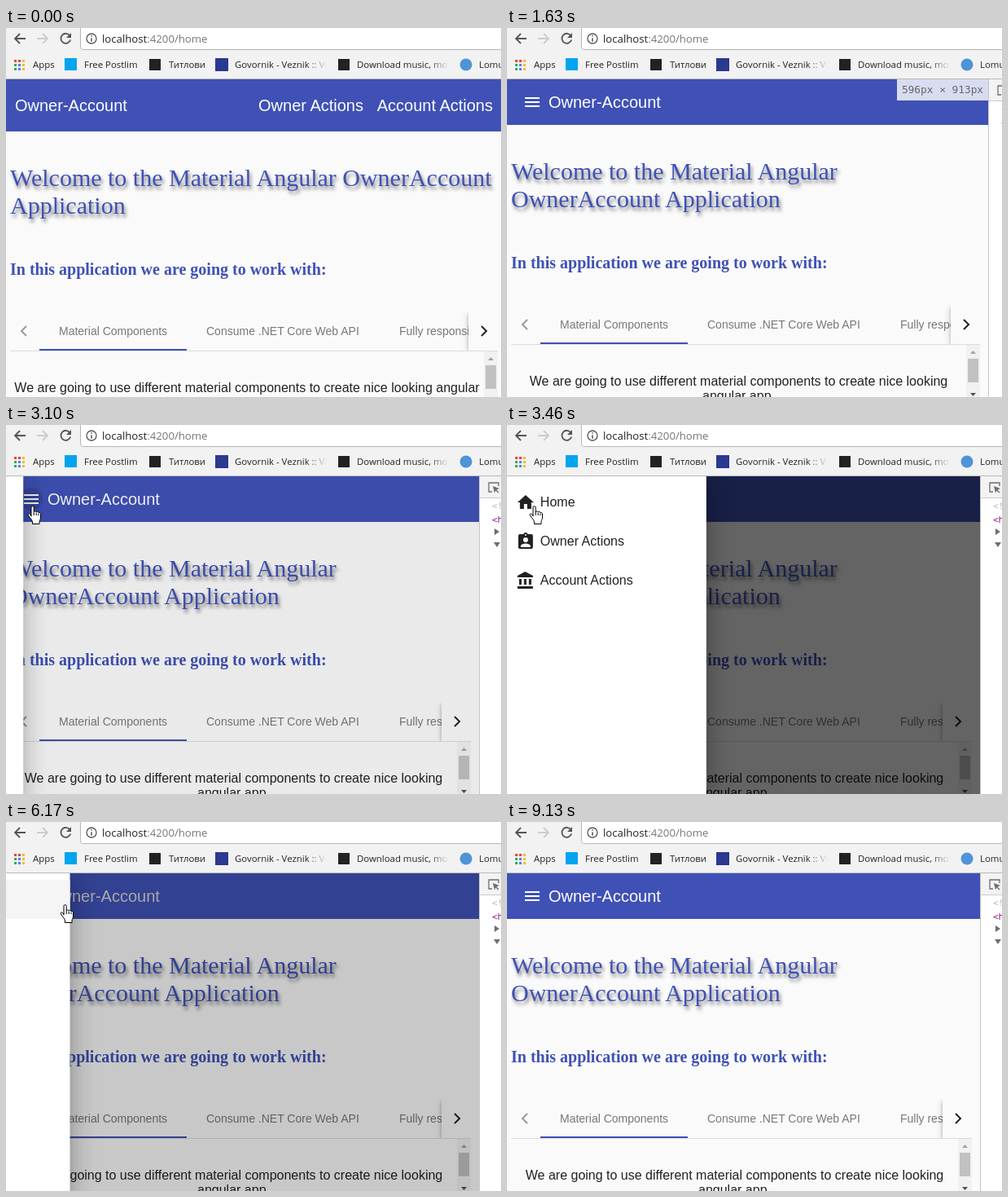
Animation of 608x453 px, one loop 9.21 s. Source, as an HTML page:

```html
<!DOCTYPE html>
<html lang="en">
<head>
<meta charset="utf-8">
<title>Owner-Account</title>
<style>
html, body { margin: 0; width: 100%; height: 100%; overflow: hidden; }
#stage { position: relative; width: 608px; height: 453px; overflow: hidden; background: #fff;
  font: 16px/18px "Liberation Sans", Arial, sans-serif; --w: 614px; }
#stage * { box-sizing: border-box; }
#stage div, #stage span, #stage svg, h1, h3, p, nav, header { position: absolute; margin: 0; white-space: nowrap; }

#browser { left: 0; top: 0; width: 608px; height: 63px; background: #f2f2f2; border-bottom: 1px solid #b9b9b9;
  font: 11.4px/18px "Open Sans", "Noto Sans", sans-serif; color: #222; }
#browser span { top: 36px; overflow: hidden; }
#browser .fade { width: 113px; -webkit-mask-image: linear-gradient(90deg, #000 78%, transparent);
  mask-image: linear-gradient(90deg, #000 78%, transparent); }
#browser #url { top: 4px; left: 118px; font-size: 13.2px; color: #777; }
#url b { font-weight: 400; color: #222; }

#page { left: 0; top: 0; width: var(--w); height: 453px; overflow: hidden; background: #fafafa; }
#bar { left: 0; top: 63px; width: 100%; height: 64px; background: #3f51b5; color: #fff; font-size: 20px; line-height: 64px; }
#title { left: 11px; }
#bar .link { right: 16px; }
#bar .link + .link { right: 175px; }
#menu { display: none; left: 11px; top: 8px; width: 40px; height: 40px; fill: #fff; }
.xs #bar { height: 56px; line-height: 56px; }
.xs #bar .link { display: none; }
.xs #title { left: 51px; }
.xs #menu { display: block; }
#body { left: 0; top: 0; width: 100%; height: 480px; }
.xs #body { top: -8px; }
h1 { left: 5px; top: 167px; width: calc(100% - 15px); font: 30px/34px "Liberation Serif", "Times New Roman", serif;
  color: #3f51b5; text-shadow: 2px 4px 4px rgba(0,0,0,.5); }
h3 { left: 5px; top: 284px; font: bold 20px/24px "Liberation Serif", "Times New Roman", serif; color: #3f51b5; }
#stage h1, #stage p { white-space: normal; }
#tabs { left: 5px; top: 348px; width: calc(100% - 15px); height: 49px; overflow: hidden;
  border-bottom: 1px solid #dcdcdc; font-size: 14px; line-height: 48px; color: rgba(0,0,0,.52); }
#ink { left: 36px; top: 46px; width: 181px; height: 2px; background: #3f51b5; }
#next { right: 0; top: 0; width: 36px; height: 48px; background: #fafafa;
  box-shadow: 0 2px 4px -1px rgba(0,0,0,.2), 0 4px 5px rgba(0,0,0,.14), 0 1px 10px rgba(0,0,0,.12); }
.chevron { top: 17px; fill: none; stroke-width: 2; }
p { left: 5px; top: 433px; width: calc(100% - 32px); text-align: center; color: rgba(0,0,0,.87); }
#scroll { right: 10px; top: 397px; }
#backdrop { left: 0; top: 63px; width: 100%; height: 390px; background: #000; }
#drawer { left: -5px; top: 63px; width: 250px; height: 390px; background: #fff; padding: 8px 0;
  box-shadow: 0 8px 10px -5px rgba(0,0,0,.2), 0 16px 24px 2px rgba(0,0,0,.14), 0 6px 30px 5px rgba(0,0,0,.12); }
#drawer .item { position: relative; height: 48px; line-height: 47px; padding-left: 46px; color: rgba(0,0,0,.87); }
#drawer .item.hover { color: #d3d3d3; background: #f5f5f5; }
.item svg { left: 16px; top: 12px; fill: currentColor; }

#badge { top: 63px; left: calc(var(--w) - 112px); width: 112px; height: 26px; text-align: center;
  background: rgba(255,255,255,.8); color: #666; font: 12.8px/26px "DejaVu Sans Mono", monospace; }
#tools { left: var(--w); top: 63px; width: 60px; height: 390px; background: #fff; border-left: 1px solid #c4c4c4;
  font: 11px/16px "DejaVu Sans Mono", monospace; color: #881280; }
#tools header { left: 0; top: 0; width: 60px; height: 27px; background: #f3f3f3; border-bottom: 1px solid #ccc; }
#tools span { left: 15px; }
#cursor { left: 0; top: 0; fill: #fff; stroke: #000; stroke-linejoin: round; }
</style>
</head>
<body>
<div id="stage">
  <div id="page">
    <div id="body">
      <h1>Welcome to the Material Angular OwnerAccount Application</h1>
      <h3>In this application we are going to work with:</h3>
      <div id="tabs">
        <svg class="chevron" style="left:12px" width="10" height="14" stroke="#999"><path d="M8 1 2 7l6 6"/></svg>
        <span style="left:60px">Material Components</span>
        <span style="left:241px">Consume .NET Core Web API</span>
        <span style="left:478px">Fully responsive</span>
        <div id="ink"></div>
        <div id="next"><svg class="chevron" style="left:14px" width="10" height="14" stroke="#222"><path d="M2 1l6 6-6 6"/></svg></div>
      </div>
      <p>We are going to use different material components to create nice looking angular app.</p>
      <svg id="scroll" width="17" height="69">
        <path fill="#f1f1f1" d="M0 0h17v69H0z"/><path fill="#c1c1c1" d="M2 17h13v29H2z"/>
        <path fill="#a3a3a3" d="M5 11l3.5-4 3.5 4z"/><path fill="#505050" d="M5 59l3.5 4 3.5-4z"/>
      </svg>
    </div>
    <div id="bar">
      <svg id="menu"><circle id="ripple" cx="20" cy="20" fill="#000" opacity=".12"/>
        <path d="M11 14h18v2H11zm0 5h18v2H11zm0 5h18v2H11z"/></svg>
      <span id="title">Owner-Account</span>
      <span class="link">Account Actions</span><span class="link">Owner Actions</span>
    </div>
    <div id="backdrop"></div>
    <nav id="drawer">
      <div class="item"><svg width="24" height="24"><path d="M10 20v-6h4v6h5v-8h3L12 3 2 12h3v8z"/></svg>Home</div>
      <div class="item"><svg width="24" height="24"><path d="M19 3h-4.2a3 3 0 0 0-5.6 0H5a2 2 0 0 0-2 2v14a2 2 0 0 0 2 2h14a2 2 0 0 0 2-2V5a2 2 0 0 0-2-2zm-7 0a1 1 0 1 1 0 2 1 1 0 0 1 0-2zm0 4a3 3 0 1 1 0 6 3 3 0 0 1 0-6zm6 12H6v-1.4c0-2 4-3.1 6-3.1s6 1.1 6 3.1z"/></svg>Owner Actions</div>
      <div class="item"><svg width="24" height="24"><path d="M4 10v7h3v-7zm6 0v7h3v-7zM2 22h19v-3H2zm14-12v7h3v-7zM11.5 1 2 6v2h19V6z"/></svg>Account Actions</div>
    </nav>
  </div>
  <div id="tools">
    <header><svg width="40" height="27" fill="none" stroke="#6e6e6e" stroke-width="1.3">
      <path d="M15 19h-4V8h12v4"/><path fill="#6e6e6e" d="M16 12l8 3-3.500 1.500 3 3-1 1-3-3-1.500 3z" stroke="none"/></svg></header>
    <span style="top:29px;color:#b8b8b8">&lt;!doctype html&gt;</span>
    <span style="top:46px">&lt;html&gt;</span>
    <svg style="left:16px;top:63px" width="12" height="28" fill="#6e6e6e"><path d="M2 1l6 4-6 4zM1 18h8l-4 6z"/></svg>
  </div>
  <div id="badge"></div>
  <div id="browser">
    <svg width="608" height="62" fill="none" stroke-width="1.8">
      <path fill="#fff" stroke="#b5b5b5" stroke-width="1" d="M620-5H94.500q-3 0-3 3v25q0 3.500 3 3.500H620z"/>
      <path stroke="#555" d="M24 13H11m6-6-6 6 6 6M78.500 9.500a6 6 0 1 0 .7 5"/>
      <path fill="#555" d="M80 6v6h-6z"/>
      <path stroke="#ccc" d="M38 13h13m-6-6 6 6-6 6"/>
      <circle cx="105" cy="13" r="6" stroke="#555" stroke-width="1.3"/>
      <path stroke="#555" stroke-width="1.500" d="M105 9v1.600m0 1.600v4.500"/>
      <g id="apps"></g>
      <path fill="#00a4ef" d="M72 37h15v15H72z"/><path fill="#222" d="M176 38h14v14h-14zM408 38h14v14h-14z"/>
      <path fill="#2b3990" d="M257 37h16v16h-16z"/><circle cx="565" cy="45" r="7.500" fill="#4f93d8"/>
    </svg>
    <span id="url"><b>localhost</b>:4200/home</span>
    <span style="left:33px">Apps</span>
    <span style="left:96px">Free Postlim</span>
    <span style="left:200px">Титлови</span>
    <span class="fade" style="left:281px">Govornik - Veznik :: Vi</span>
    <span class="fade" style="left:431px">Download music, mov</span>
    <span style="left:581px">Lomura</span>
  </div>
  <svg id="cursor" width="26" height="28">
    <g id="hand"><path d="M5 14V3.200a1.600 1.600 0 0 1 3.200 0V9a1.600 1.600 0 0 1 3-.2 1.600 1.600 0 0 1 2.800.9 1.600 1.600 0 0 1 2.500 1.300v5c0 2-1.500 3-1.500 5v2.500H6.500V21C6 18 3 16 1.300 12.800c-.8-1.500 1.200-2.800 2.300-1.200z"/>
      <path d="M8.200 9v4M11.200 9.500V13M14 10.500V13"/></g>
    <path id="arrow" d="M6.500.8v15.700l3.600-3.400 2.300 5.400 2.300-1-2.300-5.200h5z"/>
  </svg>
</div>
<script>
const LOOP = 9210, $ = id => document.getElementById(id);
const stage = $("stage"), items = [...document.querySelectorAll(".item")];
const clamp = v => Math.min(1, Math.max(0, v));
const show = (el, on) => el.style.visibility = on ? "visible" : "hidden";

// cursor stops: time, x, y
const PATH = [
  [2150, 500, 395], [2400, 210, 225], [2620, 70, 128], [2800, 26, 98], [3460, 27, 98],
  [3770, 30, 100], [4000, 32, 104], [4320, 45, 141], [4470, 46, 143], [4780, 60, 199],
  [5000, 60, 197], [5140, 60, 146], [5390, 60, 144], [5630, 64, 106], [5780, 66, 100],
  [6640, 66, 100], [6810, 72, 98], [6870, 74, 104], [7110, 118, 350]
];
const EXIT = [[7810, 368, 441], [7970, 390, 447]];

function along(path, t) {
  const i = Math.max(1, path.findIndex(k => k[0] >= t));
  const a = path[i - 1], b = path[i], p = clamp((t - a[0]) / (b[0] - a[0]));
  return [a[1] + (b[1] - a[1]) * p, a[2] + (b[2] - a[2]) * p];
}

// cubic-bezier(.25, .8, .25, 1)
function swift(x) {
  if (x <= 0 || x >= 1) return clamp(x);
  const bez = (s, a, b) => 3 * a * s * (1 - s) ** 2 + 3 * b * s * s * (1 - s) + s ** 3;
  let lo = 0, hi = 1;
  for (let i = 0; i < 20; i++) {
    const mid = (lo + hi) / 2;
    if (bez(mid, .25, .25) < x) lo = mid; else hi = mid;
  }
  return bez(lo, .8, 1);
}

["#e8453c", "#e8453c", "#f9bb2d", "#3aa757", "#4688f1", "#f9bb2d", "#3aa757", "#4688f1", "#f9bb2d"].forEach((c, i) =>
  $("apps").innerHTML += `<path fill="${c}" d="M${10 + i % 3 * 5} ${39 + (i / 3 | 0) * 5}h3v3h-3z"/>`);

function render(t) {
  const w = Math.round(614 - 33 * clamp((t - 1140) / 710));
  stage.style.setProperty("--w", w + "px");
  stage.classList.toggle("xs", w < 595);
  show($("badge"), t >= 1140 && t < 2850);
  $("badge").textContent = `${w + 5}px × 913px`;

  const open = swift((t - 3088) / 400) - swift((t - 6080) / 400);
  show($("drawer"), open > 0);
  $("drawer").style.transform = `translateX(${-250 * (1 - open)}px)`;
  $("backdrop").style.opacity = .6 * open;
  $("ripple").setAttribute("r", t < 9130 ? 20 * clamp((t - 2990) / 160) : 0);

  const [x, y] = along(t < 7500 ? PATH : EXIT, t);
  const visible = t >= 2150 && t < 7180 || t >= 7810 && t < 7970;
  const pointing = t >= 2740 && t < 6870;
  $("cursor").style.transform = `translate(${Math.round(x)}px,${Math.round(y)}px)`;
  show($("cursor"), visible);
  $("hand").style.display = pointing ? "" : "none";
  $("arrow").style.display = pointing ? "none" : "";

  const row = t >= 3770 && t < 6200 ? Math.floor((y - 71) / 48) : -1;
  items.forEach((item, i) => item.classList.toggle("hover", i === row));
  $("title").style.color = t >= 6100 && t < 6880 ? "#d3d3d3" : "#fff";
}

const start = performance.now();
function tick() {
  render((performance.now() - start) % LOOP);
  requestAnimationFrame(tick);
}
tick();
</script>
</body>
</html>
```
